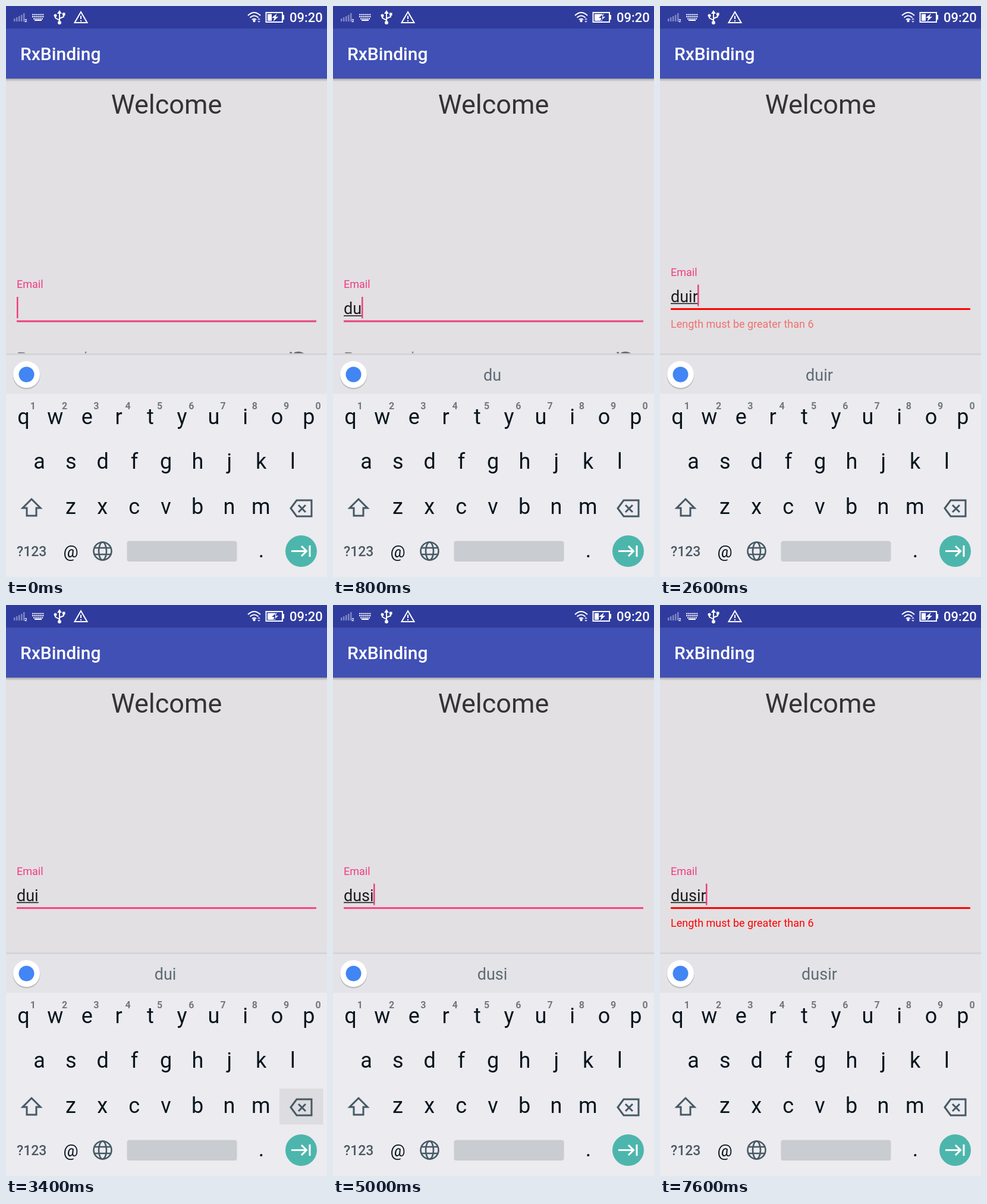
These frames come from a looping animation (540x960 px, 8000 ms). An HTML page:

```html
<!DOCTYPE html>
<html lang="en">
<head>
<meta charset="utf-8">
<title>Email field validation</title>
<style>
  html, body { margin: 0; width: 100%; height: 100%; overflow: hidden; background: #e2e0e2; }
  svg { display: block; width: 540px; height: 960px; font-family: Roboto, "Noto Sans", sans-serif; }
  .mid { text-anchor: middle; }
  .key { font-size: 36px; fill: #07151d; }
  .digit { font-size: 16px; font-weight: 700; fill: #72787d; }
  .entry { font-size: 27px; }
  .small { font-size: 18px; }
  .icon { fill: none; stroke: #455a64; stroke-width: 3; }
  .white { fill: none; stroke: #fff; stroke-width: 2; }
</style>
</head>
<body>
<svg viewBox="0 0 540 960">
  <defs>
    <linearGradient id="shade" x2="0" y2="1">
      <stop offset="0" stop-color="#000" stop-opacity=".32"/>
      <stop offset="1" stop-color="#000" stop-opacity="0"/>
    </linearGradient>
    <clipPath id="filled"><rect id="fillClip" x="436" y="10" width="12" height="20"/></clipPath>
  </defs>

  <rect width="540" height="960" fill="#e2e0e2"/>
  <rect y="121" width="540" height="6" fill="url(#shade)"/>
  <rect y="37" width="540" height="85" fill="#4050b5"/>
  <rect width="540" height="38" fill="#303c9d"/>
  <text x="24" y="91" font-size="30" font-weight="500" fill="#fff">RxBinding</text>
  <text class="mid" x="270" y="181" font-size="45" fill="#333">Welcome</text>

  <!-- status bar -->
  <g fill="#7d86c4">
    <rect x="13" y="21" width="2.5" height="5"/>
    <rect x="17" y="19" width="2.5" height="7"/>
    <rect x="21" y="17" width="2.5" height="9"/>
    <rect x="25" y="15" width="2.5" height="11"/>
    <rect x="29" y="12" width="2.5" height="14"/>
  </g>
  <text x="31" y="27" font-size="8" font-weight="700" fill="#fff">2</text>
  <g class="white">
    <path d="M44 14.5H64M44 18H64M46 21.5H62" stroke-dasharray="2.4 1"/>
    <path d="M48 24H60"/>
    <path d="M90 11V27M90 24L83 20V16M90 21L97 18V14"/>
    <path d="M115.500 28L126 10L136.500 28Z"/>
    <path d="M126 16.500V22M126 24V26"/>
    <path d="M407 16Q417.500 6 428 16M410.500 19.500Q417.500 13 424.500 19.500M414 23Q417.500 20 421 23"/>
  </g>
  <g fill="#fff">
    <path d="M90 7L94 13H86Z"/>
    <circle cx="90" cy="28" r="3"/>
    <circle cx="83" cy="16" r="2.500"/>
    <rect x="95" y="11.500" width="4.500" height="4.500"/>
    <circle cx="417.500" cy="25" r="2.200"/>
    <path d="M423 23L425.500 20L428 23ZM423 25L425.500 28L428 25Z" opacity=".75"/>
    <rect x="465" y="15" width="3" height="8"/>
    <rect id="level" x="440" y="13.500" width="8" height="11.500"/>
    <path id="bolt" d="M456 12.500L447 20H451.500L449.500 26L458 18H453.500Z"/>
  </g>
  <use href="#bolt" fill="#303c9d" clip-path="url(#filled)" style="fill:#303c9d"/>
  <rect class="white" x="437.500" y="11" width="27.500" height="16"/>
  <text x="477" y="27" font-size="22" font-weight="500" fill="#fff">09:20</text>

  <!-- form -->
  <g id="form">
    <text class="small" x="18" y="474" fill="#f03c80">Email</text>
    <text id="entry" class="entry" x="18" y="518" fill="#1c1c1c"></text>
    <rect id="compose" x="18" y="520" height="1.600" fill="#1c1c1c"/>
    <rect id="caret" y="489" width="2.500" height="36" fill="#ee3f7d"/>
    <rect id="line" x="18" y="528.500" width="504" height="3"/>
  </g>
  <text id="error" class="small" x="18" y="541" fill="#f00">Length must be greater than 6</text>
  <g id="password">
    <text class="entry" x="18" y="602" fill="#8e8d8f">Password</text>
    <path d="M478 582L502 606M485 584Q494 580 503 587" fill="none" stroke="#6c6b6d" stroke-width="3"/>
  </g>

  <!-- keyboard -->
  <rect y="584" width="540" height="3" fill="#d5d4d7"/>
  <rect y="587" width="540" height="66" fill="#e4e3e7"/>
  <rect y="652" width="540" height="308" fill="#ecebf0"/>
  <circle cx="34.500" cy="621.500" r="23" fill="#000" opacity=".16"/>
  <circle cx="34.500" cy="619.500" r="22.500" fill="#fff"/>
  <circle cx="34.500" cy="619.500" r="13" fill="#4285f4"/>
  <text id="hint" class="entry mid" x="268" y="630" fill="#5d6b74"></text>
  <rect id="press" fill="#dddce0"/>
  <g id="keys"></g>
  <g class="icon">
    <path d="M43 829L28 844H35V857H51V844H58Z"/>
    <path d="M479 844.500L489 831H514V858H489ZM492 839L504 851M504 839L492 851"/>
    <circle cx="162.500" cy="916.500" r="15" stroke-width="2.600"/>
    <ellipse cx="162.500" cy="916.500" rx="6.500" ry="15" stroke-width="2.600"/>
    <path d="M149 911H176M149 922H176" stroke-width="2.600"/>
  </g>
  <text x="18" y="925" font-size="23" font-weight="500" fill="#4b5a63">?123</text>
  <text class="mid" x="109" y="927" font-size="28" fill="#07151d">@</text>
  <rect x="203.500" y="899.500" width="185" height="34.500" rx="4" fill="#c9ccd0"/>
  <text class="key mid" x="429.500" y="927">.</text>
  <circle cx="496.500" cy="916.500" r="26.500" fill="#4db6ac"/>
  <path d="M480 916.500H505M497 908L505.500 916.500L497 925M511 907V926" fill="none" stroke="#fff" stroke-width="3"/>
</svg>

<script>
const LOOP = 8000, STEP = 200, PITCH = 53.3;
const $ = id => document.getElementById(id);
const set = (id, attrs) => {
  for (const k in attrs) $(id).setAttribute(k, attrs[k]);
};

const rows = [['qwertyuiop', 29.6, 703], ['asdfghjkl', 56, 778], ['zxcvbnm', 109, 854]];
const keyBox = {del: [460, 813, 73.5, 60.5]};

function addText(cls, x, y, s) {
  const el = document.createElementNS('http://www.w3.org/2000/svg', 'text');
  el.setAttribute('class', cls + ' mid');
  el.setAttribute('x', x);
  el.setAttribute('y', y);
  el.textContent = s;
  $('keys').append(el);
}

rows.forEach(([letters, x0, y], r) => [...letters].forEach((c, i) => {
  const x = x0 + i * PITCH;
  addText('key', x, y, c);
  if (!r) addText('digit', x + 15.7, 678, (i + 1) % 10);
  keyBox[c] = [x - PITCH / 2, y - 36, PITCH, 60];
}));

// [start, value] lists; each value holds until the next start
const typed = [[0, ''], [200, 'd'], [600, 'du'], [1000, 'dui'], [1200, 'duir'],
  [3000, 'dui'], [3600, 'du'], [4200, 'dus'], [4800, 'dusi'], [5400, 'dusir']];
const hints = typed.map(([t, s]) => [t === 1200 ? 1400 : t, s]);
const errors = [[0, 0], [2600, .5], [2800, 1], [3000, 0], [6600, .5], [6800, 1]];
const presses = [[200, 'd'], [600, 'u'], [1000, 'i'], [3000, 'del'], [3400, 'del'],
  [4200, 's'], [4800, 'i'], [5400, 'r']];
const caretOff = [[2000, 2600], [3400, 3600], [4000, 4200], [6000, 6400], [7000, 7400]];
const levels = [447, 453, 458, 462, 464];

const at = (list, t) => list.findLast(e => e[0] <= t)[1];

function draw(t) {
  const error = at(errors, t);
  const shifted = t >= 2600;
  $('entry').textContent = at(typed, t);
  $('hint').textContent = at(hints, t);
  const width = $('entry').textContent ? $('entry').getComputedTextLength() : 0;
  set('compose', {width});
  set('caret', {x: Math.floor(18 + width), opacity: caretOff.some(([a, b]) => t >= a && t < b) ? 0 : 1});
  set('form', {transform: `translate(0 ${shifted ? -20.5 : 0})`});
  set('line', {fill: error ? '#f00' : shifted ? '#ff4081' : '#ea417d'});
  set('error', {opacity: error});
  set('password', {opacity: shifted ? 0 : 1});

  const hit = presses.find(([start]) => t >= start && t < start + STEP);
  const [x, y, w, h] = hit ? keyBox[hit[1]] : [0, 0, 0, 0];
  set('press', {x, y, width: w, height: h});

  const end = levels[Math.floor(t % 2500 / 500)];
  set('level', {width: end - 440});
  set('fillClip', {width: end - 436});
}

let last = -1;
function tick() {
  const t = Math.floor(performance.now() % LOOP / STEP) * STEP;
  if (t !== last) draw(last = t);
  requestAnimationFrame(tick);
}
tick();
</script>
</body>
</html>
```
